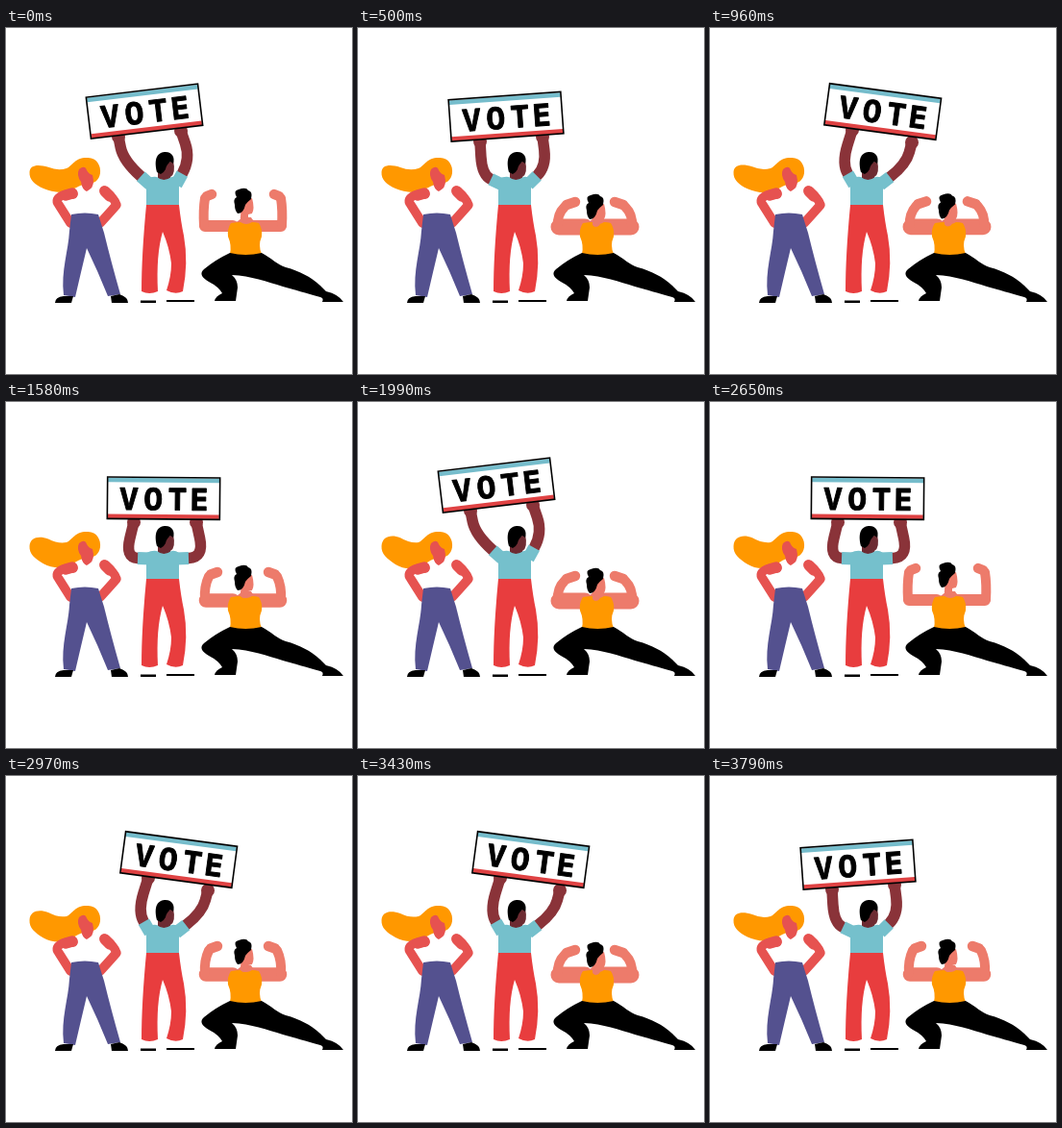
An HTML page that plays this animation: 360x360 px, repeating every 3960 ms.

```html
<!DOCTYPE html>
<html lang="en">
<head>
<meta charset="utf-8">
<title>Vote</title>
<style>
  html, body { margin: 0; width: 100%; height: 100%; overflow: hidden; background: #fff; }
  svg { display: block; width: 100%; height: 100%; }
  .limb { fill: none; stroke-linecap: round; stroke-linejoin: round; }
  .word { font: 900 32px "Noto Sans Mono", "DejaVu Sans Mono", monospace; text-anchor: middle; }
</style>
</head>
<body>
<svg viewBox="0 0 360 360">
  <g id="woman">
    <path id="mane" fill="#ff9800"/>
    <g class="limb" stroke="#e65250">
      <path d="M70 173L59 174Q50 178 55 184L67 203M102 169Q113 177 115 184Q108 192 98 203" stroke-width="9.5"/>
      <path d="M69 172L62 174M103 170L108 175" stroke-width="11.5"/>
    </g>
    <path fill="#e65250" d="M76 147Q82 142 84 148Q86 152 90 153Q93 164 87 168L84 170Q79 168 78 160Q73 153 76 147Z"/>
    <path fill="#54518f" d="M68 194Q82 191 96 194Q99 204 102 213Q109 242 119 277L106 279Q96 254 84 229Q78 254 72 280L60 278C57 252 65 232 66 211Z"/>
    <path d="M51 286Q51 280 60 279L70 279L68 286ZM110 286L109 279L118 277Q127 280 127 286Z"/>
  </g>

  <g id="man">
    <g class="limb" stroke="#8a3339">
      <path id="arms" stroke-width="11.5"/>
      <path id="hands" stroke-width="14"/>
    </g>
    <path fill="#6d2b32" d="M160 143L174 138Q177 152 171 155V162H158V149Z"/>
    <path d="M157 150C153 134 159 129 166 129C173 129 176 135 174 141L171 139Q167 142 166 147Q164 151 161 152Z"/>
    <path id="sleeves" fill="none" stroke="#75c0cc" stroke-width="13"/>
    <path fill="#75c0cc" d="M146 157Q152 154 157 155Q164 161 172 155Q176 154 180 157V185H146Z"/>
    <path fill="#e83d3e" d="M146 184H180Q182 202 185 216Q190 244 184 274Q176 278 167 273Q172 258 172 245Q170 228 163 212Q156 236 158 274Q149 278 141 274Q141 236 146 184Z"/>
    <path d="M140 283.5H156V286H140ZM167 283H196V285H167Z"/>
    <g id="sign">
      <rect x="-58.5" y="-21.7" width="117" height="43.4" fill="#fff"/>
      <rect x="-58" y="-21" width="116" height="4.5" fill="#75bccb"/>
      <rect x="-58" y="16.8" width="116" height="4.5" fill="#df4243"/>
      <rect x="-58.5" y="-21.7" width="117" height="43.4" fill="none" stroke="#000" stroke-width="1.6"/>
      <text class="word" x="-36 -10.8 14.5 37" y="12.2" stroke="#000" stroke-width=".9" stroke-linejoin="round">VOTE</text>
    </g>
  </g>

  <g id="lifter">
    <g class="limb" stroke="#ed7b6b">
      <path id="upper"/>
      <path id="fore" stroke-width="10"/>
      <path id="fists" stroke-width="10.5"/>
    </g>
    <path fill="#ed7b6b" d="M232 204Q243 202 245 197H255Q257 202 266 204V212H232Z"/>
    <path fill="#ff9800" d="M234 203Q240 202 244 202Q250 206 256 202Q260 202 263 203Q267 209 266 217Q262 226 266 235Q249 239 233 235Q235 226 231 217Q230 209 234 203Z"/>
    <g id="head">
      <path fill="#ed7b6b" d="M245 181L256 177Q259 188 256 193L252 194Q253 201 247 201Q243 200 244 196Z"/>
      <path d="M238 184Q236 178 240 176Q236 169 242 168Q250 165 252 169Q257 170 255 178Q251 181 249 184Q247 193 241 193Q238 190 238 184Z"/>
    </g>
    <path d="M233 234Q249 238 266 234C277 240 282 246 291 249C306 253 317 259 327 268L333 274Q346 277 351 285H329Q331 281 327 280C312 276 300 272 288 269C272 264 255 258 235 257Q241 262 241 270L239 284H217Q218 279 225 276Q221 269 211 264Q199 257 206 251Q218 241 233 234Z"/>
  </g>
</svg>
<script>
const LOOP = 3960, SWING = 1980, FLEX = 1320;
const $ = id => document.getElementById(id);
const mix = (a, b, k) => a + (b - a) * k;
const set = (id, d) => $(id).setAttribute("d", d);

// Sign centre and tilt, then hand and elbow of the left and right arm.
const poses = {
  left:   { sign: [144, 86.7, -6.8],  l: [117, 113, 122, 138], r: [182, 107, 192, 136] },
  midL:   { sign: [154, 92.3, -4.1],  l: [127, 118, 129, 153], r: [192, 113, 196, 144] },
  middle: { sign: [164, 100.2, 0.5],  l: [133, 125, 124, 162], r: [198, 125, 206, 162] },
  midR:   { sign: [173, 93, 4.2],     l: [139, 114, 132, 150], r: [204, 120, 206, 151] },
  right:  { sign: [179.7, 87, 7.6],   l: [148, 106, 137, 141], r: [210, 119, 204, 142] }
};

// Held poses: [start time, value]
const swing = [[0, "left"], [500, "midL"], [630, "middle"], [800, "midR"], [960, "right"],
               [1460, "midR"], [1560, "middle"], [1790, "midL"]];
const flex = [[0, 0], [170, .5], [500, 1], [830, .92], [1000, .5]];
const held = (keys, t) => keys.filter(k => k[0] <= t).pop()[1];

function drawMan({ sign: [x, y, tilt], l, r }) {
  $("sign").setAttribute("transform", `translate(${x} ${y}) rotate(${tilt})`);
  const cuff = ([, , ex, ey], sx, sy) => {
    const k = 13 / Math.hypot(ex - sx, ey - sy);
    return `${mix(sx, ex, k)} ${mix(sy, ey, k)}`;
  };
  const sides = [[l, 150, 163], [r, 177, 163]];
  const each = f => sides.map(s => f(...s)).join("");
  set("arms", each((a, sx, sy) =>
    `M${a[0]} ${a[1]}L${mix(a[0], a[2], .45)} ${mix(a[1], a[3], .45)}Q${a[2]} ${a[3]} ${cuff(a, sx, sy)}`));
  set("hands", each(a => `M${a[0]} ${a[1]}h.01`));
  set("sleeves", each((a, sx, sy) => `M${sx} ${sy}L${cuff(a, sx, sy)}`));
}

function drawLifter(k) {
  const both = f => f(x => x) + f(x => 493 - x);
  const ex = mix(207, 209, k), ey = mix(206, 207, k);
  const wx = mix(207, 215, k), wy = mix(177, 186, k);
  const fx = mix(214, 226, k), fy = mix(173, 181, k);
  $("upper").setAttribute("stroke-width", mix(12, 17, k));
  set("upper", both(m => `M${m(236)} ${ey}L${m(ex)} ${ey}`));
  set("fore", both(m => `M${m(ex - 1)} ${ey - 1}Q${m(mix(205, 207, k))} ${mix(190, 194, k)} ${m(wx)} ${wy}`));
  set("fists", both(m => `M${m(wx + 2)} ${wy - 2}L${m(fx)} ${fy}`));
  $("head").setAttribute("transform", `translate(0 ${6 * k})`);
}

function drawMane(k) {
  set("mane", `M84 135C94 134 99 143 98 151C97 158 92 162 86 162C78 162 73 167 66 ${mix(169, 170, k)}` +
    `C58 ${mix(173, 175, k)} 47 ${mix(170, 174, k)} 39 ${mix(167, 169, k)}C30 163 24 158 24.5 150` +
    `C25 ${mix(142, 140, k)} 34 ${mix(142, 137, k)} 44 ${mix(145, 141, k)}` +
    `Q54 ${mix(149, 147, k)} 63 146C70 143 71 135 84 135Z`);
}

function draw(t) {
  drawMan(poses[held(swing, t % SWING)]);
  drawLifter(held(flex, t % FLEX));
  const step = Math.floor(t / 165) * 165;
  drawMane((1 - Math.cos((step - 300) / LOOP * 2 * Math.PI)) / 2);
}

const start = performance.now();
(function tick() {
  draw((performance.now() - start) % LOOP);
  requestAnimationFrame(tick);
})();
</script>
</body>
</html>
```
